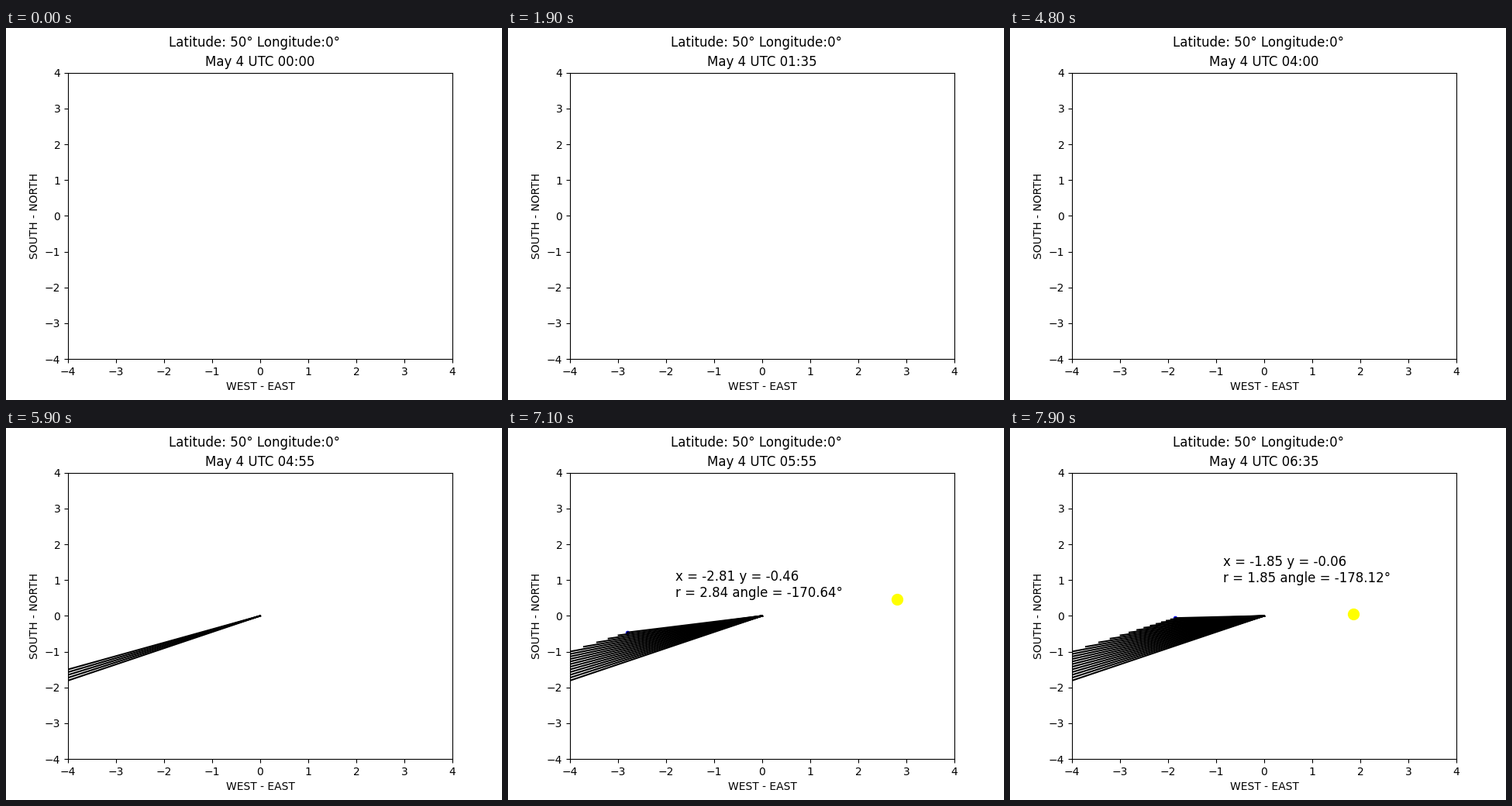
A matplotlib script that plays this animation: 640 by 480 pixels, repeating every 8000 ms.

```python
import numpy as np
import matplotlib.pyplot as plt
from matplotlib.animation import FuncAnimation

FRAMES = 80
STEP_MIN = 5                    # minutes of sky time per frame
LAT = np.radians(50)
TILT = np.radians(23.44)
LON_START = 42.675              # ecliptic longitude of the sun at 00:00, degrees
GNOMON = np.cos(LAT)


def shadow_tip(minutes):
    """Tip of the gnomon's shadow (east, north), or None while the sun is down."""
    lam = np.radians(LON_START + 360 / 365.25 * minutes / 1440)
    dec = np.arcsin(np.sin(TILT) * np.sin(lam))
    asc = np.arctan2(np.cos(TILT) * np.sin(lam), np.cos(lam))
    hour = np.radians(180 - minutes / 4) - (lam - asc)
    east = np.cos(dec) * np.sin(hour)
    north = (np.cos(LAT) * np.sin(dec)
             - np.sin(LAT) * np.cos(dec) * np.cos(hour))
    up = (np.sin(LAT) * np.sin(dec)
          + np.cos(LAT) * np.cos(dec) * np.cos(hour))
    if up <= 0:
        return None
    return -GNOMON * east / up, -GNOMON * north / up


fig, ax = plt.subplots(figsize=(6.4, 4.8), dpi=100)
fig.suptitle("Latitude: 50° Longitude:0°")
ax.set(xlim=(-4, 4), ylim=(-4, 4), xlabel="WEST - EAST", ylabel="SOUTH - NORTH")
title = ax.set_title("May 4 UTC 00:00")

sun, = ax.plot([], [], "yo", color="yellow", markersize=10)
dot, = ax.plot([], [], "b.", markersize=6)
label = ax.text(0, 0, "", fontsize=12)

tips = [shadow_tip(i * STEP_MIN) for i in range(FRAMES)]
rays = [(i, ax.plot([0, tip[0]], [0, tip[1]], "k-", lw=1.5)[0])
        for i, tip in enumerate(tips) if tip]


def update(i):
    hours, mins = divmod(i * STEP_MIN, 60)
    title.set_text(f"May 4 UTC {hours:02d}:{mins:02d}")
    for k, ray in rays:
        ray.set_visible(k <= i)

    tip = tips[i]
    for part in (sun, dot, label):
        part.set_visible(tip is not None)
    if tip:
        x, y = tip
        sun.set_data([-x], [-y])
        dot.set_data([x], [y])
        r, angle = np.hypot(x, y), np.degrees(np.arctan2(y, x))
        label.set_position((x + 1, y + 1))
        label.set_text(f"x = {x:.2f} y = {y:.2f}\nr = {r:.2f} angle = {angle:.2f}°")
    return [title, sun, dot, label] + [ray for _, ray in rays]


anim = FuncAnimation(fig, update, frames=FRAMES, init_func=lambda: update(0),
                     interval=100, repeat=True, repeat_delay=0, blit=False)
plt.show()
```
